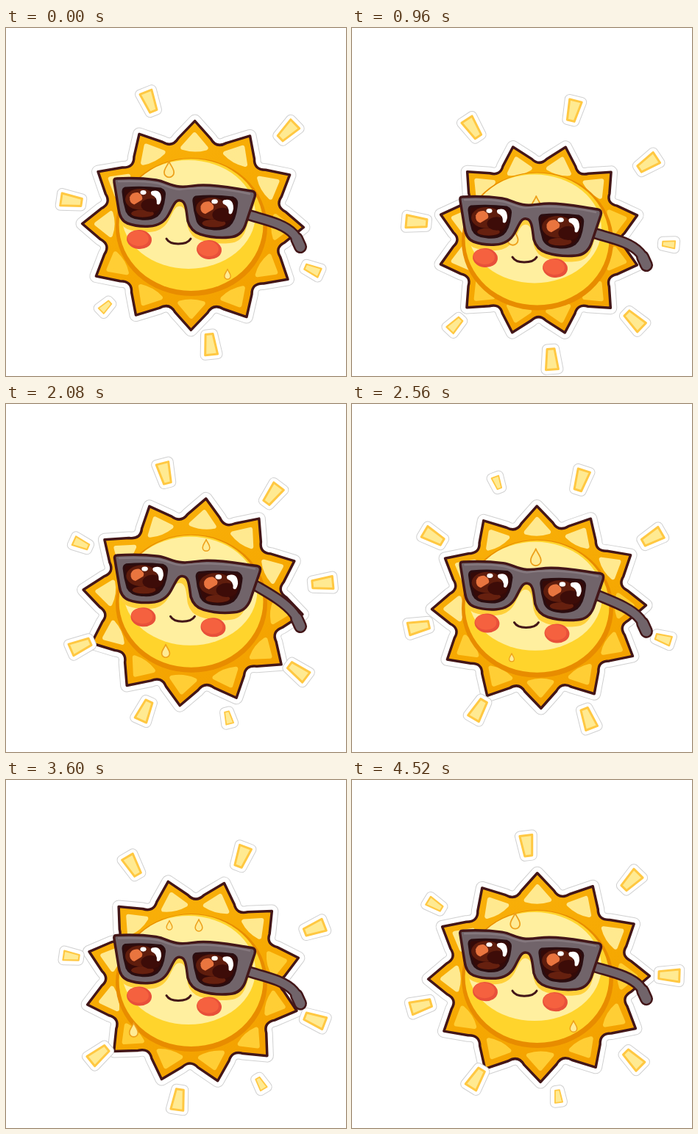
Recreate the animation shown at these times as an HTML page with a canvas. Size 462 by 474 pixels, loop 4560 ms.

```html
<!DOCTYPE html>
<html lang="en">
<head>
<meta charset="utf-8">
<title>Sunny</title>
<style>
html, body { margin: 0; width: 100%; height: 100%; overflow: hidden; background: #fff; }
canvas { display: block; }
</style>
</head>
<body>
<canvas id="stage" width="462" height="474"></canvas>
<script>
const c = document.getElementById('stage').getContext('2d');
const STEP = 40, COUNT = 114, CX = 254, CY = 269, DARK = '#431618', GREY = '#71646a';
const rad = d => d * Math.PI / 180;
const mix = (a, b, u) => a + (b - a) * u;
const clamp = u => Math.min(1, Math.max(0, u));
const ease = u => (u = clamp(u)) * u * (3 - 2 * u);

// Key points: [step, value]
const bounce = [[0, 0], [24, 25], [40, -16], [49, 8], [57, -14], [64, 10], [80, 4], [100, 9], [114, 0]];
const headTurn = [[28, 0], [40, 1], [80, 0]];
const orbit = [[0, 136], [24, 5], [40, -98], [64, -471], [80, -582], [100, -778], [112, -997]];

// Each drop appears on the forehead, slips behind the glasses and ends on the chin
const drops = [
  { start: 74, life: 124, from: 222, to: 217 },
  { start: 38, life: 72, from: 272, to: 173 },
  { start: 82, life: 40, from: 262, to: 301 },
  { start: 14, life: 24, from: 256, to: 242 }
];

function sample(track, f, shape = ease) {
  let i = 1;
  while (i < track.length - 1 && f > track[i][0]) i++;
  const [a, b] = [track[i - 1], track[i]];
  return mix(a[1], b[1], shape(clamp((f - a[0]) / (b[0] - a[0]))));
}

function paint(path, fill, stroke, width) {
  if (fill) { c.fillStyle = fill; c.fill(path); }
  if (stroke) { c.strokeStyle = stroke; c.lineWidth = width; c.stroke(path); }
}

function oval(x, y, rx, ry, fill, tilt = 0) {
  c.fillStyle = fill;
  c.beginPath();
  c.ellipse(x, y, rx, ry, tilt, 0, 7);
  c.fill();
}

function crown(f, dy, cy) {
  const size = 1.01 - dy * .0033, first = 1.842 * f - 89;
  const at = (r, deg) => [CX + 149 * size * r * Math.cos(rad(deg)), cy + 141 * size * r * Math.sin(rad(deg))];
  const star = new Path2D(), gems = [];
  for (let i = 0; i < 12; i++) {
    const a = first + i * 30;
    star.lineTo(...at(1, a));
    star.lineTo(...at(.845, a + 10));
    star.quadraticCurveTo(...at(.765, a + 15), ...at(.845, a + 20));
    const gem = new Path2D();
    gem.moveTo(...at(.87, a));
    gem.lineTo(...at(.75, a + 8));
    gem.quadraticCurveTo(...at(.71, a), ...at(.75, a - 8));
    gem.closePath();
    gems.push([gem, Math.cos(rad(a)) * .4 + Math.sin(rad(a)) < .1 ? '#ffe98f' : '#ffce35']);
  }
  star.closePath();
  const glow = c.createLinearGradient(CX - 60, cy - 130, CX + 60, cy + 130);
  glow.addColorStop(0, '#f9b00a');
  glow.addColorStop(.5, '#f6a902');
  glow.addColorStop(1, '#f3a000');
  paint(star, 0, '#d0d0d0', 18);
  paint(star, 0, '#fff', 16);
  paint(star, glow, DARK, 3.5);
  for (const [gem, col] of gems) paint(gem, col, col, 6);
}

function ray(x, y, angle, size) {
  c.save();
  c.translate(x, y);
  c.rotate(angle + Math.PI / 2);
  c.scale(size, size);
  const p = new Path2D('M-8.5-14 L8.5-14 L5 14 L-5 14Z');
  paint(p, 0, '#d0d0d0', 14 / size);
  paint(p, '#fff', '#fff', 12 / size);
  paint(p, '#ffea92', '#ffc842', 3);
  c.restore();
}

// The ring turns in hard steps of four and is sparser around the loop point
function rayRing(f, cy) {
  const sparse = f < 12 || (f >= 92 && f < 108);
  const count = sparse ? 6 : 8, small = sparse ? 4 : 3;
  const base = sample(orbit, f - f % 4, u => u);
  for (let n = 0; n < count; n++) {
    const even = 360 * n / count;
    const a = rad(base + even - 9 * Math.sin(rad(even)));
    ray(CX + 5 + 172 * Math.cos(a), cy - 9 + 172 * Math.sin(a), a, n === 0 ? .6 : n === small ? .75 : 1);
  }
}

function drop({ start, life, from, to }, f) {
  const u = ((f - start + COUNT) % COUNT + (life > COUNT && f >= start && f < start + life - COUNT ? COUNT : 0)) / life;
  if (u >= 1) return;
  const slide = ease((u - .3) / .45), s = Math.min(1, .3 + u * 2, (1 - u) * 3);
  c.save();
  c.translate(mix(from, to, Math.sqrt(slide)), mix(191, 335, slide));
  c.scale(s, s);
  paint(new Path2D('M0-11 C2-5 7-1 7 5 A7 7 0 0 1-7 5 C-7-1-2-5 0-11Z'), '#ffeb95', '#eda01b', 1.8 / Math.sqrt(s));
  c.restore();
}

const frame = new Path2D('M150 205 C170 204 190 205 204 207 C217 209 222 215 236 216 C248 217 254 214 268 214 C292 214 312 219 334 222 Q340 223 338 230 L325 269 Q319 284 304 285 Q283 287 264 281 Q251 277 247 263 C245 250 245 236 237 235 C230 233 227 243 221 254 Q213 269 195 270 Q178 271 165 266 Q155 262 153 247 L147 210 Q146 205 150 205Z');
const lens = new Path2D('M2 0 Q25-2 49 1 Q56 4 54 12 Q52 30 44 37 Q35 43 22 41 Q8 40 4 31 Q0 18-1 5 Q-1 1 2 0Z');

function drawLens(x, y, size) {
  c.save();
  c.translate(x, y);
  c.scale(size, size);
  paint(lens, '#350a08', '#2a0d10', 3);
  c.clip(lens);
  oval(22, 15, 20, 14, '#5f1d0d');
  oval(25, 34, 15, 5, '#66200f');
  oval(36, 23, 13, 9, '#3d0c08');
  paint(new Path2D('M8 12 Q11 5 19 6 Q27 11 24 16 L14 22 Q7 20 8 12Z'), '#e9753f');
  oval(26, 6, 4, 3, '#fff');
  paint(new Path2D('M38 4 Q50 1 50 15 Q48 25 44 21 Q45 12 37 9 Q35 5 38 4Z'), '#fff');
  c.restore();
}

function temple(k) {
  const bar = new Path2D(`M${328 + 9 * k} ${254 - 13 * k} C${350 + 4 * k} ${261 - 8 * k} 378 ${266 + 2 * k} 391 ${281 + 4 * k} Q399 ${290 + 5 * k} 400 ${299 + 5 * k}`);
  const tip = new Path2D(`M395 ${287 + 5 * k} L400 ${298 + 5 * k}`);
  for (const [col, extra] of [[DARK, 5], [GREY, 0]]) {
    paint(bar, 0, col, 10.5 + extra);
    paint(tip, 0, col, 13 + extra);
  }
}

function face(dy, cy, k) {
  c.save();
  c.translate(0, cy - CY);
  oval(252, 271, 103, 94, '#e88c00');
  oval(251.5, 268, 98, 90, '#ffd42c');
  c.beginPath();
  c.ellipse(251.5, 268, 98, 90, 0, 0, 7);
  c.clip();
  oval(248 + 3 * k, 254, 91, 74, '#ffef9f');
  c.translate(0, dy - (cy - CY) + 8);
  paint(frame, '#ffd03a');
  c.restore();

  c.save();
  c.translate(7 * k, dy + 1.5 * k);
  for (const [x, y] of [[181, 288], [276, 302]]) {
    oval(x, y, 17, 13, '#e8503a', .1);
    oval(x - 1.5, y - 1.5, 14.5, 10.5, '#f5613f', .1);
  }
  paint(new Path2D('M218 287 Q222 294 234 294 Q247 294 251 287'), 0, DARK, 3);
  c.restore();
}

function glasses(dy, k) {
  c.save();
  c.translate(0, dy);
  temple(k);
  c.translate(147, 204);
  c.transform(1 + .042 * k, -.018 * k, 0, 1, k, 0);
  c.translate(-147, -204);
  paint(frame, GREY, DARK, 3.5);
  paint(new Path2D('M153 209 Q185 208 203 211 C216 213 222 219 236 220 Q250 218 268 218 Q300 219 331 226'), 0, '#85787e', 2.5);
  drawLens(160, 218, 1.02);
  drawLens(256, 230, 1.06);
  c.restore();
}

function draw() {
  const f = Math.floor(performance.now() / STEP) % COUNT;
  const dy = sample(bounce, f), cy = CY + dy * .78, k = sample(headTurn, f);
  c.fillStyle = '#fff';
  c.fillRect(0, 0, 462, 474);
  c.lineJoin = c.lineCap = 'round';
  crown(f, dy, cy);
  rayRing(f, cy);
  face(dy, cy, k);
  c.save();
  c.translate(0, dy);
  for (const d of drops) drop(d, f);
  c.restore();
  glasses(dy, k);
  requestAnimationFrame(draw);
}
draw();
</script>
</body>
</html>
```
